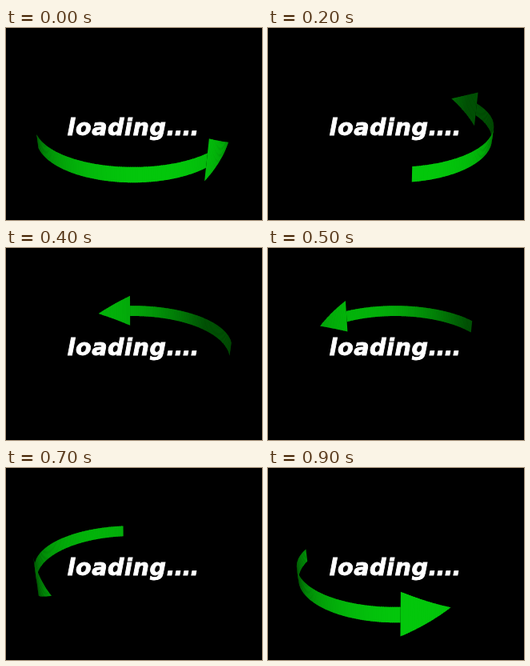
Recreate the animation shown at these times as an HTML page with a canvas. Size 320x240 px, loop 1 s.

```html
<!DOCTYPE html>
<html lang="en">
<head>
<meta charset="utf-8">
<title>Loading</title>
<style>
  html, body { margin: 0; width: 100%; height: 100%; overflow: hidden; background: #000; }
  canvas, svg { position: absolute; left: 0; top: 0; width: 320px; height: 240px; }
  text {
    font: italic 700 28.6px "DejaVu Sans", sans-serif;
    letter-spacing: 0.6px;
    fill: #fff; stroke: #fff; stroke-width: 0.9px;
  }
  .dots { letter-spacing: -0.9px; }
</style>
</head>
<body>
<canvas id="stage" width="320" height="240"></canvas>
<svg viewBox="0 0 320 240"><text x="76.5" y="134">loading<tspan class="dots">....</tspan></text></svg>
<script>
const ctx = document.getElementById('stage').getContext('2d');
const RAD = Math.PI / 180;

// Camera looking down on a vertical ring
const CX = 159, CY = 117.5, RADIUS = 117.8, DIST = 412;
const SIN = 0.4155, COS = 0.9096;

// Arrow wrapped round the ring, in degrees and half heights
const TIP = 62.9, ARC = 127.3, HEAD = 24.5, BAND = 8.5, BARB = 24.5;
const STEPS = 10, STEP_MS = 100;

function project(deg, h) {
  const x = RADIUS * Math.sin(deg * RAD);
  const z = RADIUS * Math.cos(deg * RAD);
  const s = DIST / (DIST - z * COS - h * SIN);
  return [CX + x * s, CY + (z * SIN - h * COS) * s];
}

// Outer face is lit from the front, inner face from the back left
function shade(deg) {
  const lit = peak => Math.max(0, Math.cos((deg - peak) * RAD));
  const outside = Math.cos(deg * RAD) > 0.26;
  const g = outside ? 60 + 140 * Math.pow(lit(10), 0.8) : 80 + 100 * lit(210);
  return `rgb(${g * 0.02 | 0},${g | 0},${g * 0.06 | 0})`;
}

// One slice between two angles, with its half height at each end
function slice(a, b, ha, hb) {
  return { a, b, ha, hb, mid: (a + b) / 2, depth: Math.cos((a + b) / 2 * RAD) };
}

function arrow(tip) {
  const base = tip - HEAD, tail = tip - ARC, parts = [];
  for (let a = tail; a < base; a++) {
    parts.push(slice(a, Math.min(a + 1.5, base), BAND, BAND));
  }
  const half = a => BARB * (tip - a) / HEAD;
  for (let a = base; a < tip; a++) {
    const b = Math.min(a + 1.5, tip);
    parts.push(slice(a, b, half(a), half(b)));
  }
  return parts.sort((p, q) => p.depth - q.depth);
}

function draw(step) {
  ctx.fillStyle = '#000';
  ctx.fillRect(0, 0, 320, 240);
  for (const p of arrow(TIP + step * 360 / STEPS)) {
    ctx.fillStyle = shade(p.mid);
    ctx.beginPath();
    ctx.moveTo(...project(p.a, p.ha));
    ctx.lineTo(...project(p.b, p.hb));
    ctx.lineTo(...project(p.b, -p.hb));
    ctx.lineTo(...project(p.a, -p.ha));
    ctx.fill();
  }
}

function tick() {
  draw(Math.floor(performance.now() / STEP_MS) % STEPS);
  requestAnimationFrame(tick);
}
tick();
</script>
</body>
</html>
```
